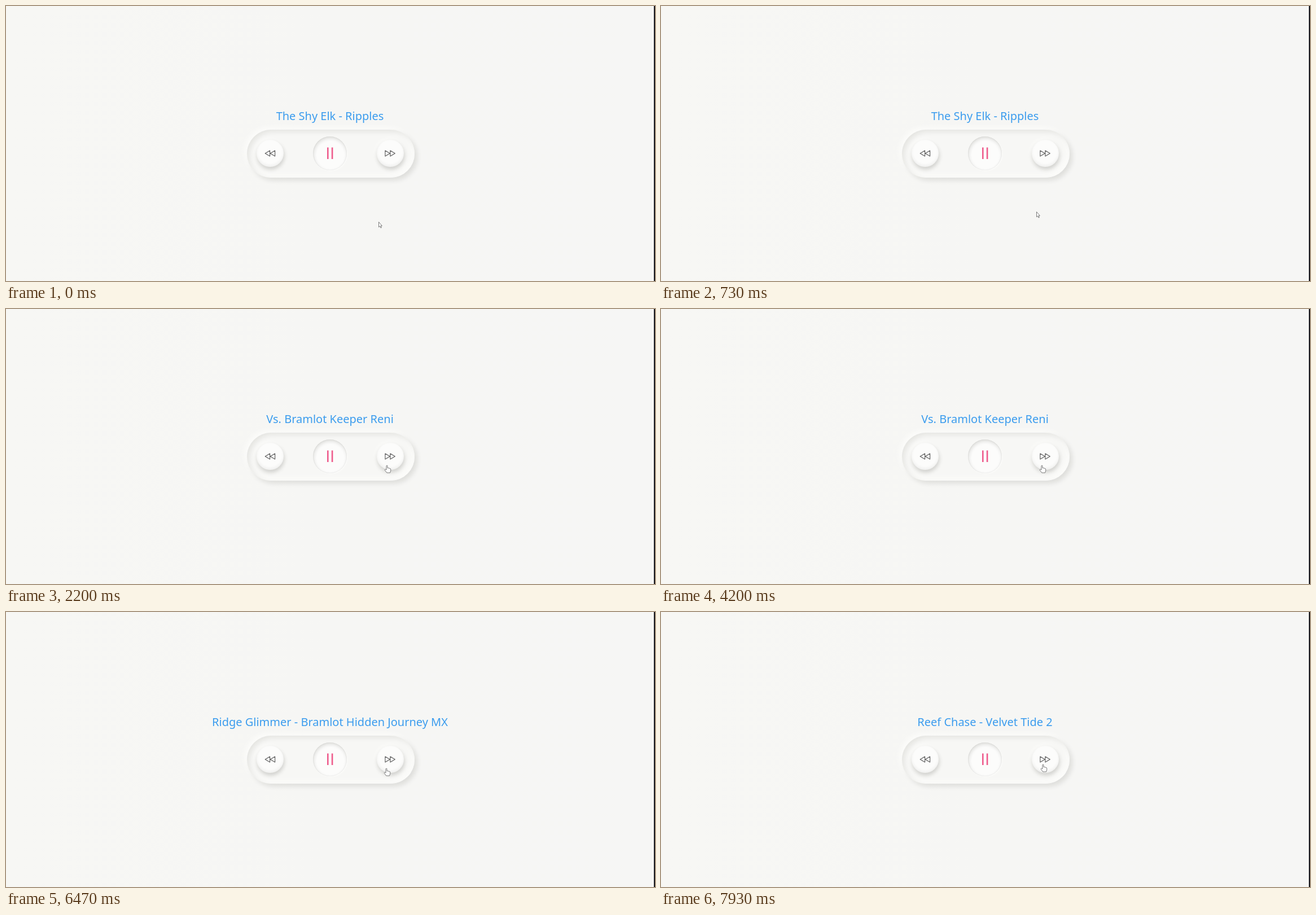
Animation of 1150 by 487 pixels, one loop 8000 ms. Source, as an HTML page:

```html
<!DOCTYPE html>
<html lang="en">
<head>
<meta charset="utf-8">
<title>Music player</title>
<style>
  html, body { margin: 0; width: 100%; height: 100%; overflow: hidden; }
  #stage {
    position: relative; width: 1150px; height: 487px; overflow: hidden;
    background: linear-gradient(90deg, #f7f7f4, #f6f6f4 50%, #f6f6f5);
  }
  #stage > * { position: absolute; box-sizing: border-box; }
  .bar {
    left: 427px; top: 219px; width: 297px; height: 85px; border-radius: 43px;
    background: #f7f7f5;
    box-shadow: 5px 5px 8px rgba(20, 20, 10, .1), -4px -4px 8px #fcfcfa,
      inset 4px 4px 8px rgba(20, 20, 10, .08), inset -5px -5px 8px #fcfcfa;
  }
  .button { border-radius: 50%; background: #fcfcfb; }
  .skip {
    top: 237px; width: 48px; height: 48px;
    box-shadow: 1px 4px 7px rgba(20, 20, 10, .18), -2px -2px 6px #fcfcfa,
      inset 0 -3px 5px rgba(20, 20, 10, .05);
  }
  .prev { left: 444px; }
  .next { left: 657px; }
  .play { left: 544px; top: 231px; width: 60px; height: 60px; }
  .play, .pressed {
    box-shadow: inset 1px 3px 6px rgba(20, 20, 10, .14), inset 0 0 2px rgba(20, 20, 10, .1),
      1px 1px 2px #fdfdfb;
  }
  .edge { right: 0; top: 0; width: 2px; height: 487px; background: #16161c; }
  svg { left: 0; top: 0; }
  text { font: 20px "Noto Sans", "Open Sans", sans-serif; fill: #3b9cee; text-anchor: middle; }
  .icon { fill: none; stroke: #5c5c5c; stroke-width: 1.15; stroke-linejoin: round; }
  .pause { stroke: #ee5c8c; stroke-width: 2.6; }
  .pointer path { fill: #fff; stroke: #6c6c6c; stroke-width: .9; stroke-linejoin: round; }
</style>
</head>
<body>
<div id="stage">
  <div class="bar"></div>
  <div class="button skip prev"></div>
  <div class="button play"></div>
  <div class="button skip next" id="next"></div>
  <svg width="1150" height="487" viewBox="0 0 1150 487">
    <text id="title" x="574" y="201.5"></text>
    <path class="icon" d="M467.6 256V266L459.2 261ZM476.6 256V266L468.2 261Z"/>
    <path class="icon" d="M671.9 256V266L680.3 261ZM680.9 256V266L689.3 261Z"/>
    <path class="pause" d="M570.3 250.5V271M578.1 250.5V271"/>
    <g class="pointer" id="pointer">
      <path id="arrow" d="M.5 .5V9.6L2.5 7.8L4 11L5.4 10.4L4 7.3H6.4Z"/>
      <path id="hand" d="M-1 8V1Q-1 0 0 0Q1 0 1 1V4.6Q2.2 3.9 3 5Q4.3 4.4 5 5.5Q6.6 5.2 6.7 6.8V9.5L5.5 13H-.2L-3.7 8.4Q-4 7 -2.7 6.8Z"/>
    </g>
  </svg>
  <div class="edge"></div>
</div>
<script>
  const LOOP = 8000, FPS = 15;
  const BUTTON = { x: 681, y: 261, r: 24 };

  const titles = [
    [0, "The Shy Elk - Ripples"],
    [2200, "Vs. Bramlot Keeper Reni"],
    [5330, "Ridge Glimmer - Bramlot Hidden Journey MX"],
    [7930, "Reef Chase - Velvet Tide 2"]
  ];
  const presses = [[2000, 2200], [5070, 5330], [7670, 7930]];

  // [time, x, y] of the pointer tip
  const path = [
    [0, 660, 382], [533, 660, 382], [733, 665, 364], [867, 665, 360],
    [1267, 675, 277], [6333, 675, 277], [7133, 666, 275.5], [7400, 677, 270]
  ];

  const byId = id => document.getElementById(id);
  const [title, next, pointer, arrow, hand] = ["title", "next", "pointer", "arrow", "hand"].map(byId);
  const ease = u => u * u * (3 - 2 * u);

  function pointerAt(time) {
    const i = path.findIndex(key => key[0] > time);
    if (i < 0) return path[path.length - 1].slice(1);
    const [t0, x0, y0] = path[i - 1], [t1, x1, y1] = path[i];
    const u = ease((time - t0) / (t1 - t0));
    return [x0 + (x1 - x0) * u, y0 + (y1 - y0) * u];
  }

  function render(time) {
    const stepped = Math.floor((time + 4) * FPS / 1000) * 1000 / FPS;
    const [x, y] = pointerAt(stepped).map(Math.round);
    const over = Math.hypot(x - BUTTON.x, y - BUTTON.y) < BUTTON.r;
    pointer.setAttribute("transform", `translate(${x} ${y})`);
    arrow.style.display = over ? "none" : "";
    hand.style.display = over ? "" : "none";

    const label = titles.filter(([start]) => start <= time).pop()[1];
    if (title.textContent !== label) title.textContent = label;
    next.classList.toggle("pressed", presses.some(([down, up]) => time >= down && time < up));
  }

  const start = performance.now();
  function tick() {
    render((performance.now() - start) % LOOP);
    requestAnimationFrame(tick);
  }
  tick();
</script>
</body>
</html>
```
